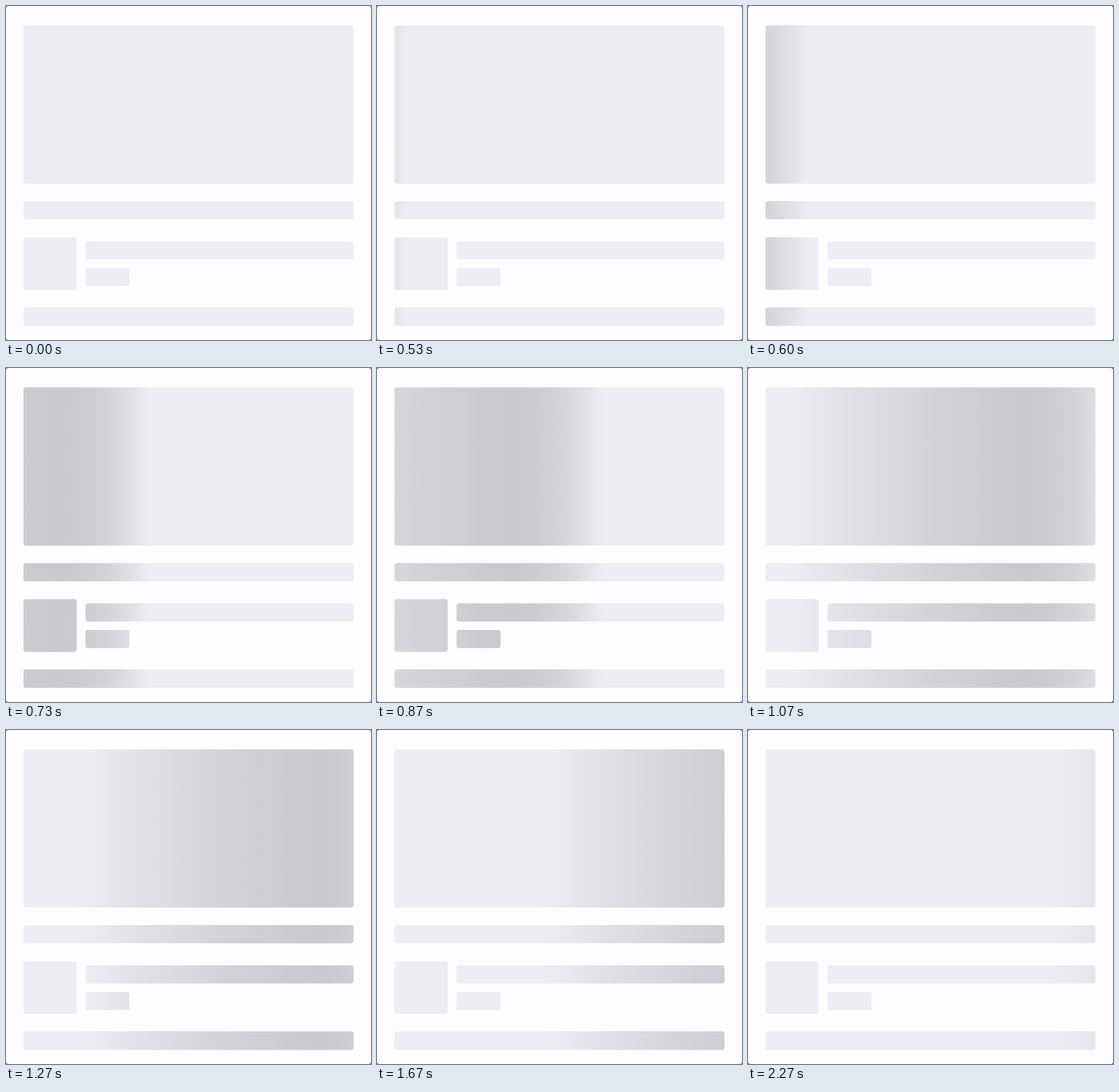
An HTML page that plays this animation: 480x440 px, repeating every 3270 ms.

```html
<!DOCTYPE html>
<html lang="en">
<head>
<meta charset="utf-8">
<title>Skeleton loader</title>
<style>
  html, body { margin: 0; width: 100%; height: 100%; overflow: hidden; background: #5c5b5e; }
  svg { display: block; width: 480px; height: 440px; }
</style>
</head>
<body>
<svg viewBox="0 0 480 440" xmlns="http://www.w3.org/2000/svg">
  <defs>
    <linearGradient id="shine" gradientUnits="userSpaceOnUse" y1="0" y2="0"></linearGradient>
  </defs>
  <rect width="480" height="440" rx="3" fill="#fffdff"/>
  <g fill="url(#shine)">
    <rect x="23" y="25.5" width="434" height="208.5" rx="3.5"/>
    <rect x="23" y="257" width="434" height="24" rx="3.5"/>
    <rect x="23" y="304.5" width="70" height="69.5" rx="3.5"/>
    <rect x="104.5" y="310" width="352.5" height="24" rx="3.5"/>
    <rect x="104.5" y="345" width="58" height="24" rx="3.5"/>
    <rect x="23" y="397" width="434" height="24.5" rx="3.5"/>
  </g>
</svg>
<script>
const LOOP = 3270, FPS = 15;
const BAND = 435, FRONT = 120;
const LIGHT = [239, 237, 243], DARK = [202, 201, 205];
const shine = document.getElementById("shine");

const easeOut = (u, power) => 1 - (1 - u) ** power;
const mix = (a, b, u) => a + (b - a) * u;

// Darkness at a distance behind the leading edge: short front, long tail
function shade(back) {
  return back < FRONT
    ? easeOut(back / FRONT, 2)
    : easeOut((BAND - back) / (BAND - FRONT), 1.4);
}

const STOPS = 29;
for (let i = 0; i <= STOPS; i++) {
  const dark = shade(BAND * (1 - i / STOPS));
  const stop = document.createElementNS(shine.namespaceURI, "stop");
  stop.setAttribute("offset", i / STOPS);
  stop.setAttribute("stop-color", `rgb(${LIGHT.map((c, n) => Math.round(mix(c, DARK[n], dark)))})`);
  shine.append(stop);
}

// Key points of the sweep: tick, leading edge
const keys = [[7, 0], [9, 80], [13, 297], [14, 405], [17, 526], [19, 530], [34, 835]];
// The slow exit only moves on these ticks
const holds = [17, 19, 22, 25, 29, 34];

function leadAt(tick) {
  if (tick <= keys[0][0]) return 0;
  const i = keys.findIndex(key => key[0] >= tick);
  const [t0, x0] = keys[i - 1], [t1, x1] = keys[i];
  return mix(x0, x1, (tick - t0) / (t1 - t0));
}

function draw(ms) {
  let tick = Math.floor((ms + 4) * FPS / 1000);
  if (tick > holds[0]) tick = Math.max(...holds.filter(h => h <= tick));
  const lead = leadAt(tick);
  shine.setAttribute("x1", lead - BAND);
  shine.setAttribute("x2", lead);
}

const begin = performance.now();
function frame() {
  draw((performance.now() - begin) % LOOP);
  requestAnimationFrame(frame);
}
draw(0);
requestAnimationFrame(frame);
</script>
</body>
</html>
```
